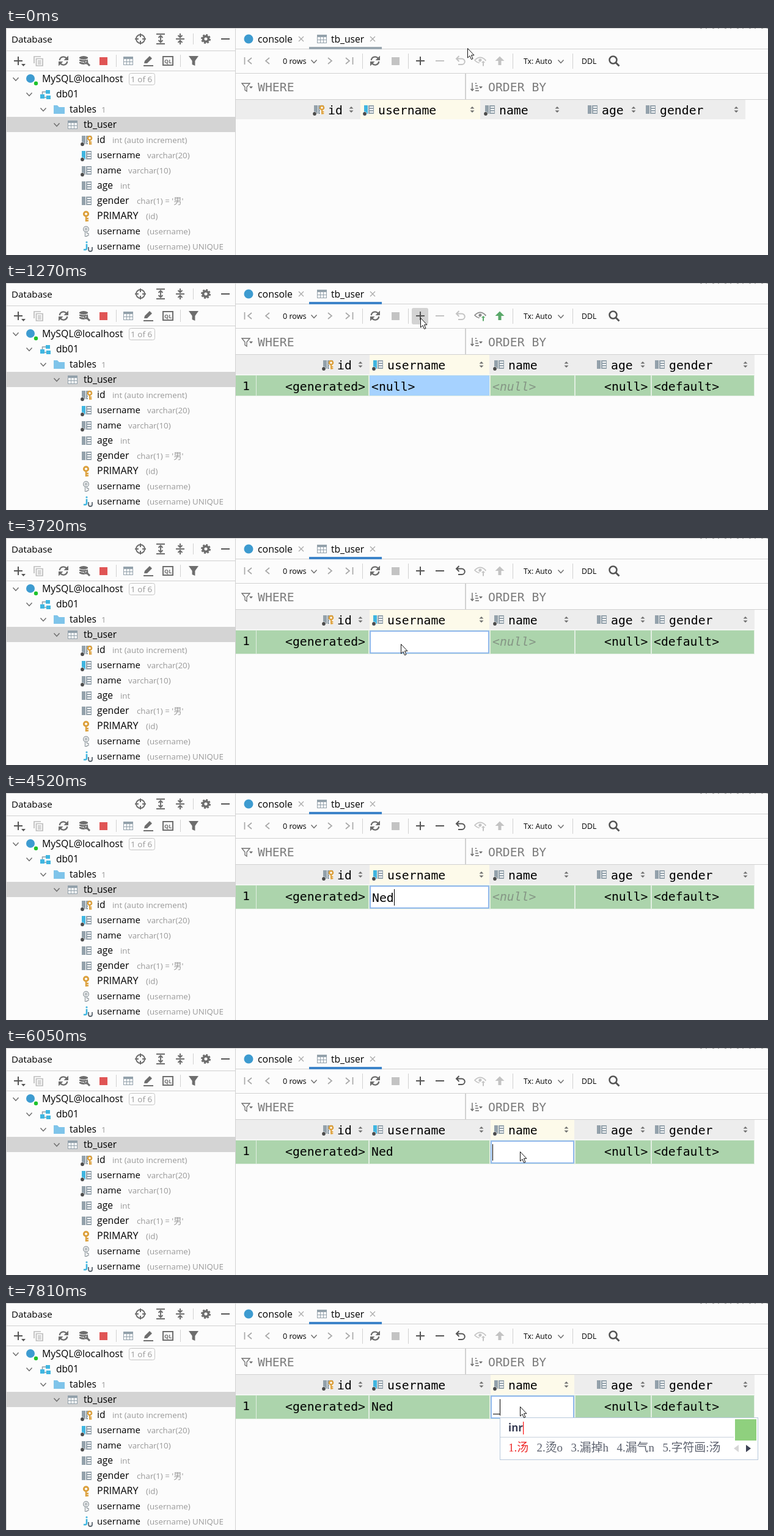
An HTML page for the animation above (8000 ms loop, 1247 px wide and 373 px high).

```html
<!DOCTYPE html>
<html lang="en">
<head>
<meta charset="utf-8">
<title>Table editor</title>
<style>
  html, body { margin: 0; width: 100%; height: 100%; overflow: hidden; background: #fcfcfc; }
  svg { display: block; width: 100vw; height: 100vh; }
  text { font-family: "Open Sans", "Noto Sans", "Noto Sans CJK SC", sans-serif; white-space: pre; }
  .mono { font-family: "DejaVu Sans Mono", monospace; font-size: 19.8px; }
  .ime { font-family: "Liberation Serif", "Noto Sans CJK SC", serif; font-weight: 300; }
</style>
</head>
<body>
<svg viewBox="0 0 1247 373"><g id="base"></g><g id="live"></g></svg>
<script>
const LOOP = 8000;
const INK = '#6e6e6e', OFF = '#c3c3c3', STEEL = '#93a1ab', SKY = '#40b6e0', GOLD = '#dca03c';
const GREEN = '#59a869', ROW = '#acd4ac', LINE = '#d1d1d1', BG = '#fcfcfc';

const esc = s => s.replace(/</g, '&lt;');
const rect = (x, y, w, h, fill, more = '') =>
  `<rect x="${x}" y="${y}" width="${w}" height="${h}" fill="${fill}" ${more}/>`;
const path = (d, stroke, width = 2, fill = 'none') =>
  `<path d="${d}" stroke="${stroke}" stroke-width="${width}" fill="${fill}"/>`;
const solid = (d, fill) => `<path d="${d}" fill="${fill}"/>`;
const dot = (x, y, r, fill, more = '') => `<circle cx="${x}" cy="${y}" r="${r}" fill="${fill}" ${more}/>`;
const ring = (x, y, r, stroke, width, more = '') =>
  dot(x, y, r, 'none', `stroke="${stroke}" stroke-width="${width}" ${more}`);
const text = (x, y, s, size, fill = '#000', more = '') =>
  `<text x="${x}" y="${y}" font-size="${size}" fill="${fill}" ${more}>${esc(s)}</text>`;
const mono = (x, y, s, fill = '#000', more = '') =>
  `<text class="mono" x="${x}" y="${y}" fill="${fill}" ${more}>${esc(s)}</text>`;
const at = (x, y, body) => `<g transform="translate(${x} ${y})">${body}</g>`;
const vline = (x, y, h) => rect(x, y, 1, h, LINE);
const hline = (x, y, w) => rect(x, y, w, 1, LINE);

// Icons, centred on 0,0
const icon = {
  target: () => ring(0, 0, 7, INK, 2) + path('M0-9V-3M0 3V9M-9 0H-3M3 0H9', INK),
  expand: () => path('M-7-8H7M-7 8H7M0-5V5M-3.5-2L0-5.5 3.5-2M-3.5 2L0 5.5 3.5 2', INK),
  collapse: () => path('M-7 0H7M0-9V-3M0 9V3M-3.5-6L0-2.5 3.5-6M-3.5 6L0 2.5 3.5 6', INK),
  gear: () => ring(0, 0, 4.4, INK, 3.6) + ring(0, 0, 6.8, INK, 2.4, 'stroke-dasharray="3 2.34"'),
  plus: (c = '#555') => path('M-7 0H7M0-7V7', c),
  minus: (c = '#555') => path('M-7 0H7', c),
  copy: () => path('M-7 4V-7H4M-3.5-3.5H7V8H-3.5ZM-1 0H4.5M-1 2.5H4.5M-1 5H4.5', '#bcbcbc', 1.7),
  refresh: () => path('M-6.3-1A6.3 6.3 0 0 1 5-4M6.3 1A6.3 6.3 0 0 1-5 4', INK, 2.2) +
    solid('M8-8.5V-1H.5ZM-8 8.5V1H-.5Z', INK),
  database: () => [-5, -1, 3].map(y => solid(`M-8 ${y - 1}Q-1 ${y - 5} 6 ${y - 1}V${y + 1}Q-1 ${y + 5}-8 ${y + 1}Z`, INK)).join('') +
    path('M-8-3.5Q-1 0 6-3.5M-8 .5Q-1 4 6 .5', BG, 1) + path('M1 0L9 9', BG, 7) + path('M3 2L9 8', INK, 3) + ring(3, 2, 2.4, INK, 2),
  table: () => rect(-8, -7, 16, 14, STEEL) + [-7, -2, 3].map(x => rect(x, -3, 4, 4, BG) + rect(x, 2, 4, 4, BG)).join(''),
  pencil: () => path('M-8 8H8', INK) + solid('M-7 4L-6 0 2-8 6-4-2 4Z', INK),
  ql: () => path('M-8-7H8V7H-8Z', INK) + text(-6, 3.5, 'QL', 9, INK, 'font-weight="700"'),
  funnel: () => solid('M-8-8H8L2.4 0V8L-2.4 6V0Z', INK),
  chevron: (c = INK) => path('M-4.5-2.5L0 2.5 4.5-2.5', c, 1.5),
  left: () => path('M3-5L-3 0 3 5', '#a8a8a8', 1.7),
  right: () => path('M-3-5L3 0-3 5', '#a8a8a8', 1.7),
  undo: c => path('M-6-3.5H2A4.6 4.6 0 0 1 2 6H-4M-2.5-8L-7-3.5-2.5 1', c),
  eye: (c, a) => path('M-9-1Q0-10 9-1Q0 8-9-1Z', c, 1.7) + dot(0, -1, 2.6, c) +
    at(5, 4, path('M0-5.5L5.5 0H2V5.5H-2V0H-5.5Z', BG, 2, a)),
  up: c => solid('M0-7.5L7.5 0H2.5V7H-2.5V0H-7.5Z', c),
  search: () => ring(-1.5, -1.5, 6, '#555', 2.5) + path('M3 3L8.5 8.5', '#555', 3),
  close: () => path('M-4-4L4 4M4-4L-4 4', '#aaa', 1.3),
  schema: () => rect(-8, 0, 7, 7, SKY) + rect(1, -7, 7, 6, SKY) + rect(2, 2, 7, 6, SKY) + path('M-4.5 0V-4H1M-1 5H2', '#8b9aa5', 1.4),
  folder: () => solid('M-9-7H-3L0-4H9V7H-9Z', '#7fc4ea'),
  key: c => ring(0, -3.5, 3.6, c, 3) + path('M0 0V9M0 4H4M0 7.5H4', c, 2.4),
  keyOutline: c => ring(0, -3.5, 4.4, c, 1.3) + ring(0, -3.5, 1.6, c, 1.2) + path('M-1.5 1V8.5H1.5V7H4V3.5H1.5V1', c, 1.2),
  column: (kind = '') => rect(-8, -7, 6, 14, /i/.test(kind) ? SKY : STEEL) +
    rect(-1, -7, 9, 14, STEEL) + [-5, -1, 3].map(y => rect(1, y, 6, 2, BG)).join('') +
    (/k/.test(kind) ? rect(2, -5, 7, 13, BG) + at(5, 0, `<g transform="scale(.85)">${icon.key(GOLD)}</g>`) : '') +
    (/n/.test(kind) ? dot(-7, 7, 3.6, BG) + dot(-7, 7, 2.9, '#4c4c4c') : ''),
  unique: () => dot(-1, -7, 1.6, SKY) + path('M-1-4V3Q-1 6-6 5', SKY, 2.6) + path('M2 1V5Q2 8 5 8T8 5V1', '#5b6670', 1.8),
  sort: () => solid('M-3.5-1.5L0-5 3.5-1.5ZM-3.5 1.5L0 5 3.5 1.5Z', INK),
};
const put = (name, x, y, ...args) => at(x, y, icon[name](...args));

function sidebar() {
  const note = '#999';
  const cols = [
    ['id', 174, 'int (auto increment)', 'kn', 15.6],
    ['username', 231, 'varchar(20)', 'in', 15],
    ['name', 200, 'varchar(10)', 'n', 15],
    ['age', 187, 'int', '', 15.6],
    ['gender', 214, "char(1) = '男'", '', 15.9],
    ['PRIMARY', 229, '(id)', 0, 16],
    ['username', 231, '(username)', 0, 15],
    ['username', 231, '(username) UNIQUE', 0, 15],
  ];
  return text(9, 24, 'Database', 15.2) +
    put('target', 220, 18) + put('expand', 253, 18) + put('collapse', 285, 18) + vline(306, 9, 18) +
    put('gear', 327, 18) + put('minus', 359, 18) + hline(0, 37, 375) +
    put('plus', 20, 54) + solid('M25 59H32L28.5 63Z', '#555') + put('copy', 53, 54) + put('refresh', 94, 54) +
    put('database', 128, 54) + rect(153, 48, 13, 13, '#e05555') + vline(180, 44, 20) + put('table', 200, 54) +
    put('pencil', 233, 54) + put('ql', 265, 54) + vline(285, 44, 20) + put('funnel', 307, 54) + hline(0, 70, 375) +
    rect(0, 146, 375, 25, '#d4d4d4') +
    [16, 38, 61, 83].map((x, i) => put('chevron', x, 84 + 25 * i)).join('') +
    dot(40, 83, 7, '#3d9bd0') + dot(49, 91, 3.2, '#1fc32b') + text(59, 89, 'MySQL@localhost', 15.9) +
    rect(201.5, 74.5, 42, 19, 'none', 'rx="3" stroke="#c4c4c4"') + text(204, 89, '1 of 6', 13.5, note) +
    put('schema', 64, 109) + text(82, 114, 'db01', 15.6) +
    put('folder', 87, 134) + text(104, 139, 'tables', 15.6) + text(156, 139, '1', 13.3, note) +
    put('table', 109, 159) + text(127, 164, 'tb_user', 15.6) +
    cols.map(([name, x, type, kind, size], i) => {
      const y = 184 + 25 * i;
      return (kind === 0 ? '' : put('column', 132, y, kind)) + text(149, y + 5, name, size) + text(x, y + 5, type, 13.3, note);
    }).join('') +
    put('key', 131, 309, GOLD) + put('keyOutline', 131, 334, '#8f989e') + put('unique', 133, 359);
}

function editorFrame() {
  return dot(397, 18, 7.5, '#3d9bd0') + text(412, 24, 'console', 15.9) + put('close', 483, 18) +
    put('table', 517, 18) + text(532, 24, 'tb_user', 15.6) + put('close', 600, 18) + hline(376, 34, 871) +
    path('M390.5 48V60', '#a8a8a8', 1.7) + put('left', 399, 54) + put('left', 428, 54) + text(453, 59, '0 rows', 12.6) +
    put('chevron', 504, 55) + put('right', 530, 54) + put('right', 559, 54) + path('M567.5 48V60', '#a8a8a8', 1.7) +
    vline(583, 42, 25) + put('refresh', 604, 54) + rect(631, 48, 13, 13, OFF) + vline(658, 42, 25) +
    vline(829, 42, 25) + text(847, 59, 'Tx: Auto', 12.3) + put('chevron', 908, 55) + vline(927, 42, 25) +
    text(942, 59, 'DDL', 12.3) + put('search', 995, 54) + hline(376, 74, 871) + rect(751, 75, 2, 42, LINE) +
    path('M386 91H399L394 97V104L391 102V97Z', INK, 1.3) + solid('M398 96H404L401 99.5Z', INK) +
    mono(412, 104, 'WHERE', '#7c7c7c') +
    path('M763 90V103M760.5 100L763 103 765.5 100', INK, 1.4) +
    path('M768 91H770M768 95H772M768 99H773M768 103H774', INK, 1.5) + solid('M774 96H780L777 99.5Z', INK) +
    mono(789, 104, 'ORDER BY', '#7c7c7c') + hline(376, 117, 871);
}

// Stepped tracks: each entry holds from its time until the next one
const pick = (track, t) => track.reduce((v, k) => t >= k[0] ? k : v);
const POINTER = [
  [0, 755, 33], [150, 740, 38], [300, 712, 47], [450, 686, 55], [600, 678, 57], [1510, 679, 60], [1650, 684, 70],
  [1780, 691, 84], [1930, 698, 98], [2080, 564, 155], [2360, 610, 163], [2510, 646, 174], [4090],
  [5240, 700, 165], [5380, 775, 161], [5500, 820, 167], [5650, 841, 170],
];
const TYPED = [[0, ''], [4090, 'N'], [4370, 'Ne'], [4520, 'Ned']];
const IME = [
  [0], [7140, 'i', 1219, ['1.不', '2.水i', '3.小心h', '4.没有n', '5.不同意:小']],
  [7410, 'in', 1245, ['1.尚', '2.没事o', '3.漏水h', '4.漏气n', '5.小数点:水']],
  [7810, 'inr', 1231, ['1.汤', '2.烫o', '3.漏掉h', '4.漏气n', '5.字符画:汤']],
];
const STEPS = [0, 1000, 1120, 1270, 1390, 2790, 3040, 3720, 5800, 6050, 7020,
  ...[POINTER, TYPED, IME].flat().map(k => k[0])].sort((a, b) => a - b);

function header(shift, active) {
  const cols = [['id', 512, 565, 'kn'], ['username', 594, 763, 'in'], ['name', 792, 902, 'n'], ['age', 960, 1027, ''], ['gender', 1055, 1195, '']];
  const [x, w] = active === 'name' ? [778, 137] : [580, 196];
  return at(shift, 0, rect(376 - shift, 118, 834 + shift, 32, '#ededed') + rect(x, 118, w, 32, '#fdfaea') +
    cols.map(([name, ix, sx, kind]) => put('column', ix, 134, kind) + mono(ix + 15, 142, name) + put('sort', sx, 134)).join(''));
}

const editor = (x, w) => rect(x + 1, 153, w - 2, 36, '#fff', 'stroke="#91b9ec" stroke-width="2"');
const caret = x => rect(x, 158, 1, 27, '#000');

function row(t) {
  const h = t < 2790 ? 33 : 38, typed = pick(TYPED, t)[1];
  const cells = [[376, 33], [410, 183], [595, 196], [793, 137], [932, 123], [1057, 167]];
  let out = rect(376, 151, 849, h + 2, '#e2eee2') + cells.map(([x, w]) => rect(x, 152, w, h, ROW)).join('') +
    mono(387, 176, '1') + mono(457, 177, '<generated>') + mono(979, 177, '<null>') + mono(1060, 177, '<default>');
  if (t < 2790) out += rect(595, 152, 196, h, '#a6d2ff') + mono(598, 177, '<null>');
  else if (t < 5800) {
    const blink = t >= 3040 && t < 3720 || t >= 4090 && t < 5240;
    out += editor(595, 196) + mono(599, 179, typed) + (blink ? caret(599 + 12 * typed.length) : '');
  } else out += mono(598, 177, typed);
  if (t < 6050) {
    if (t >= 5800) out += rect(793, 152, 137, h, '#a6d2ff');
    out += mono(796, 177, '<null>', '#859585', 'font-style="italic"');
  } else {
    out += editor(793, 137);
    if (t < 7020) out += caret(796);
    if (t >= 7140) out += rect(797, 182, 11, 1, '#000') + caret(808);
  }
  return out;
}

function popup(t) {
  const [, keys, right, words] = pick(IME, t);
  if (!keys) return '';
  const list = words.map((w, i) => `<tspan dx="${i ? 13.5 : 0}" fill="${i ? '#5c616e' : '#ee2a2a'}">${w}</tspan>`).join('');
  const keyEnd = 822 + [0, 5, 16, 24][keys.length];
  return rect(808.5, 188.5, right - 809, 69, '#fff', 'stroke="#b8c9dc"') + rect(809, 220, right - 849, 1, '#c9d2dc') +
    text(822, 211, keys, 17, '#3a3f56', 'font-weight="700"') + rect(keyEnd, 195, 1.3, 21, '#f22') +
    rect(right - 38, 191, 35, 35, '#8fd07e') +
    `<text class="ime" x="822" y="244" font-size="18.9">${list}</text>` +
    at(right - 36, 239, solid('M4-6V6L-4 0Z', '#d6d6d6')) + at(right - 16, 239, solid('M-4-6V6L4 0Z', '#3d4254'));
}

function scene(t) {
  const added = t >= 1120, ready = t >= 1270 && t < 3040, edit = t >= 1390 ? '#555' : OFF;
  const [, px, py] = pick(POINTER, t);
  const hover = t >= 450 && t < 1650;
  return rect(496, 31, 119, 4, t < 1000 ? '#9aa7b0' : '#3d84c9') +
    (hover ? rect(664, 41, 27, 27, '#d3d3d3', 'rx="3"') : '') + put('plus', 678, 54) +
    put('minus', 710, 54, edit) + put('undo', 744, 54, edit) +
    put('eye', 776, 54, ready ? '#8a8a8a' : OFF, ready ? GREEN : OFF) + put('up', 808, 54, ready ? GREEN : OFF) +
    header(added ? 15 : 0, t < 5800 ? 'username' : 'name') + (added ? row(t) : '') + popup(t) +
    (px ? at(px, py, path('M.5.5V16L4 12.7 6.5 18.5 9 17.5 6.5 11.7H11Z', '#111', 1, '#fff')) : '');
}

const base = document.getElementById('base'), live = document.getElementById('live');
base.innerHTML = rect(0, 0, 1247, 373, BG) + hline(0, 0, 1247) +
  '<path d="M1136 .5H1247" stroke="#888" stroke-dasharray="3 6 2 9"/>' +
  vline(0, 0, 373) + sidebar() + vline(375, 0, 373) + editorFrame();

let shown = -1;
function draw(now) {
  const t = now % LOOP;
  const step = STEPS.filter(s => s <= t).pop();
  if (step !== shown) live.innerHTML = scene(shown = step);
  requestAnimationFrame(draw);
}
draw(performance.now());
</script>
</body>
</html>
```
